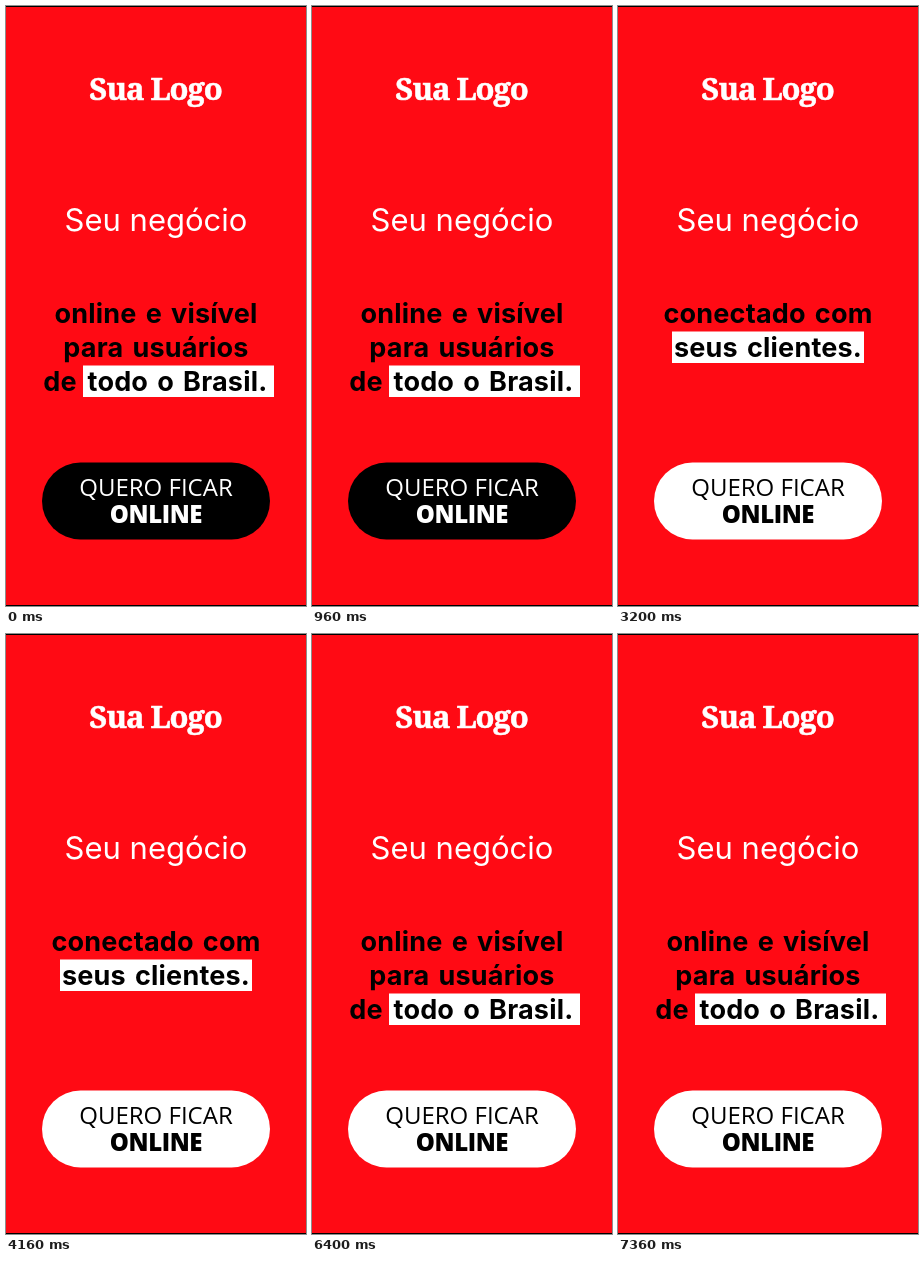
Recreate the animation shown at these times as an HTML page. Size 300 by 600 pixels, loop 8000 ms.

```html
<!DOCTYPE html>
<html lang="pt-BR">
<head>
<meta charset="utf-8">
<title>Banner</title>
<style>
  html, body { margin: 0; width: 100%; height: 100%; overflow: hidden; background: #ff0a14; }
  svg { display: block; width: 100vw; height: 100vh; }
  text { text-anchor: middle; }
  .logo { font: 900 31px "Noto Serif", serif; letter-spacing: -1.1px; stroke: #fff; stroke-width: .6px; }
  .lead { font: 400 31px Inter, sans-serif; }
  .claim { font: 700 27px Inter, sans-serif; letter-spacing: .2px; word-spacing: 2.5px; }
  .cta { font: 400 24px "Open Sans", sans-serif; }
  .cta .strong { font-weight: 800; letter-spacing: -.4px; }
</style>
</head>
<body>
<svg viewBox="0 0 300 600">
  <rect width="300" height="600" fill="#ff0a14"/>
  <path d="M0 .5H300M0 599.5H300" stroke="#000"/>
  <g fill="#fff">
    <text class="logo" x="149.5" y="93.5">Sua Logo</text>
    <text class="lead" x="150" y="225">Seu negócio</text>
  </g>
  <g class="claim" id="claim"></g>
  <rect id="pill" x="36" y="456.5" width="228" height="77" rx="38.5"/>
  <g class="cta" id="cta">
    <text x="150" y="490">QUERO FICAR</text>
    <text class="strong" x="150" y="517">ONLINE</text>
  </g>
</svg>
<script>
const STEP = 1600;
const [claim, pill, cta] = ["claim", "pill", "cta"].map(id => document.getElementById(id));

const line = (row, text, x = 150) => `<text x="${x}" y="${317 + 34 * row}">${text}</text>`;
const marked = (row, text, left, right, x) =>
  `<rect x="${left}" y="${291.5 + 34 * row}" width="${right - left}" height="31.5" fill="#fff"/>` + line(row, text, x);

const online = line(0, "online e visível") + line(1, "para usuários") +
  line(2, "de", 54) + marked(2, "todo o Brasil.", 77, 268, 171.5);
const connected = line(0, "conectado com") + marked(1, "seus clientes.", 54, 246);
const reaching = line(0, "alcançando") + marked(1, "clientes em", 68, 232) +
  marked(2, "potencial.", 72, 228);

const scenes = [
  [online, "#000"], [connected, "#000"],
  [connected, "#fff"], [reaching, "#fff"], [online, "#fff"]
];
let shown = -1;

function draw() {
  const index = Math.floor(performance.now() / STEP) % scenes.length;
  if (index !== shown) {
    const [text, color] = scenes[shown = index];
    claim.innerHTML = text;
    pill.setAttribute("fill", color);
    cta.setAttribute("fill", color === "#000" ? "#fff" : "#000");
  }
  requestAnimationFrame(draw);
}
draw();
</script>
</body>
</html>
```
